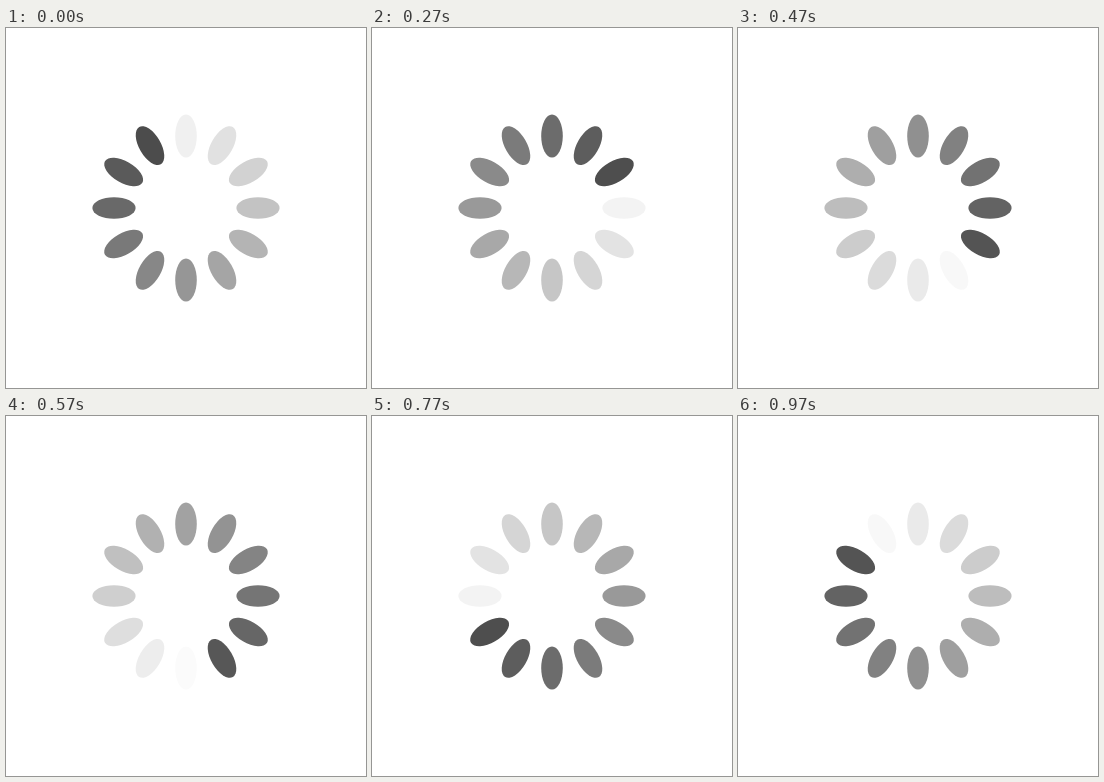
An HTML page for the animation above (1010 ms loop, 360x360 px).

```html
<!DOCTYPE html>
<html lang="en">
<head>
<meta charset="utf-8">
<title>Spinner</title>
<style>
  html, body { margin: 0; width: 100%; height: 100%; overflow: hidden; background: #fff; }
  svg { display: block; width: 100vw; height: 100vh; }
</style>
</head>
<body>
<svg id="stage" viewBox="0 0 360 360" fill="#4c4c4c"></svg>
<script>
  const LOOP = 1010, STEPS = 30, COUNT = 12;
  const stage = document.getElementById("stage");

  const petals = Array.from({ length: COUNT }, (_, i) => {
    const el = document.createElementNS("http://www.w3.org/2000/svg", "ellipse");
    const attrs = { cx: 180, cy: 108, rx: 10.8, ry: 21.6, transform: `rotate(${i * 360 / COUNT} 180 180)` };
    for (const name in attrs) el.setAttribute(name, attrs[name]);
    return stage.appendChild(el);
  });

  // Steps last 30, 40, 30 ms in turn; the last one lasts 40.
  const stepStart = k => 30 * k + 10 * Math.floor((k + 1) / 3);

  function stepAt(time) {
    let k = STEPS - 1;
    while (k > 0 && stepStart(k) > time) k--;
    return k;
  }

  // Each petal fades linearly over one turn, a twelfth after its neighbour.
  function draw(k) {
    const now = Math.floor(1000 * k / STEPS);
    petals.forEach((el, i) => {
      const lead = Math.floor(1000 * (COUNT - 1 - i) / COUNT);
      el.setAttribute("opacity", 1 - (now + lead) % 1000 / 1000);
    });
  }

  const origin = performance.now();
  function tick() {
    draw(stepAt((performance.now() - origin) % LOOP));
    requestAnimationFrame(tick);
  }
  tick();
</script>
</body>
</html>
```
